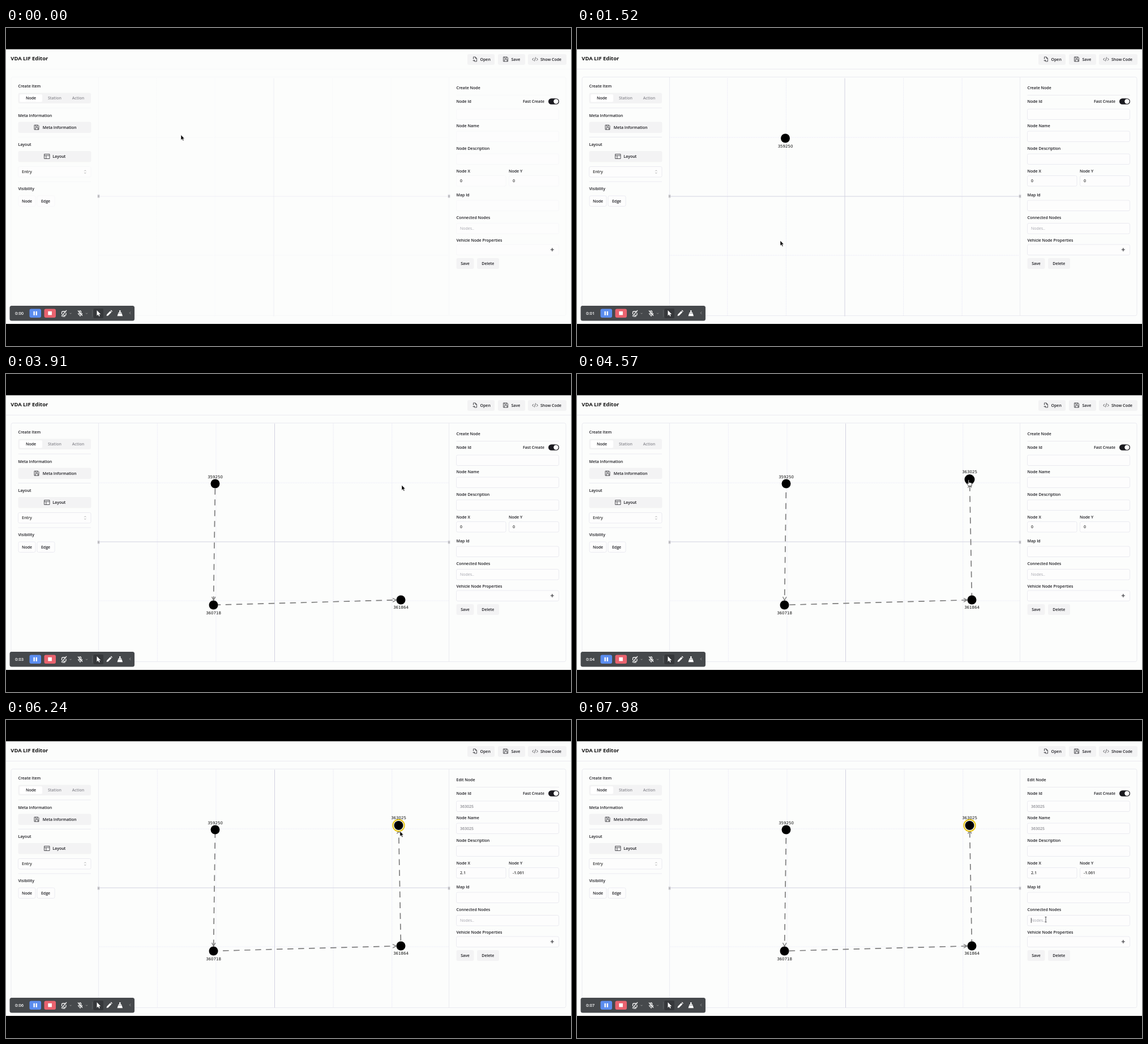
An HTML page for the animation above (8 s loop, 998x561 px).

```html
<!DOCTYPE html>
<html lang="en">
<head>
<meta charset="utf-8">
<title>VDA LIF Editor</title>
<style>
  html, body { margin: 0; width: 100%; height: 100%; overflow: hidden; background: #000; }
  svg { display: block; width: 100vw; height: 100vh; }
  text { font: 600 7px "Open Sans", "Noto Sans", sans-serif; fill: #1b1b20; white-space: pre; }
  .mid { text-anchor: middle; }
  .title { font-size: 9.4px; font-weight: 700; fill: #111; }
  .value { fill: #333; }
  .soft { fill: #8b8b91; }
  .hint { font-weight: 400; fill: #a4a4ac; }
  .label { font: 7px "DejaVu Sans", Verdana, sans-serif; fill: #111; text-anchor: middle; }
  .clock { font-size: 7.6px; fill: #fff; }
  .rule { fill: none; stroke: #e6e6ee; stroke-width: .8; }
  .icon { fill: none; stroke: #2c2c31; stroke-width: .8; }
  .tool { fill: none; stroke: #f2f2f2; stroke-width: 1.3; }
  .dim { fill: none; stroke: #999; stroke-width: 1; }
  .edge { fill: none; stroke: #7d7d7d; stroke-width: 1.7; }
</style>
</head>
<body>
<svg id="stage" viewBox="0 0 998 561" preserveAspectRatio="none"></svg>
<script>
const stage = document.getElementById('stage');
const LOOP = 8000;

const rect = (x, y, w, h, fill, r = 0, more = '') =>
  `<rect x="${x}" y="${y}" width="${w}" height="${h}" rx="${r}" fill="${fill}" ${more}/>`;
const text = (x, y, s, cls = '', id = '') => `<text x="${x}" y="${y}" class="${cls}" id="${id}">${s}</text>`;
const path = (d, cls, more = '') => `<path d="${d}" class="${cls}" ${more}/>`;
const box = (x, y, w, h) => rect(x, y, w, h, '#fdfdfd', 2.5, 'stroke="#e6e6ee" stroke-width=".8"');
const button = (x, y, w, h) => rect(x, y, w, h, '#f3f3f4', 3);

const disk = (x, y) => path(
  `M${x - 3.5} ${y - 4}h6l1.5 1.5v6.5h-8v-8zM${x - 1.8} ${y - 4}v2.5h3.6v-2.5M${x - 2} ${y + 4}v-3.5h4.5v3.5`, 'icon');

function header() {
  return text(8.3, 56.6, 'VDA LIF Editor', 'title')
    + path('M0 72.5H998', 'rule')
    + button(815, 46, 48, 19) + button(869, 46, 48, 19) + button(922, 46, 68, 19)
    + path('M825.5 55v-4h3.5l2.5 2.5v5.5h-4M829 51v2.5h2.5M824.5 57.5h3.5m-1.5-1.5l1.5 1.5l-1.5 1.5', 'icon')
    + disk(882.5, 55)
    + path('M932 53l-2.3 2.3l2.3 2.3M937 53l2.3 2.3l-2.3 2.3M935.5 51.5l-2 7', 'icon')
    + text(837.5, 57.7, 'Open') + text(892.5, 57.7, 'Save') + text(944, 57.7, 'Show Code');
}

function leftPanel() {
  const rules = [141, 192.5, 271].map(y => path(`M21.5 ${y}H150`, 'rule')).join('');
  return rules
    + text(21.5, 105, 'Create Item')
    + button(21.5, 114.5, 128.5, 18.5) + rect(24, 117, 40, 13.5, '#fff', 2)
    + text(44, 126.4, 'Node', 'mid') + text(86, 126.4, 'Station', 'mid soft') + text(127.5, 126.4, 'Action', 'mid soft')
    + text(21.5, 156.6, 'Meta Information')
    + button(21.5, 165.5, 129, 19.5) + disk(54, 175.2) + text(64.7, 177.8, 'Meta Information')
    + text(21.5, 208, 'Layout')
    + button(21.5, 217, 129, 19.5)
    + path('M67.5 222.5h9.5v8h-9.5zM67.5 225h9.5M70.8 225v5.5', 'icon') + text(82.3, 229.2, 'Layout')
    + box(21.5, 244.5, 128.5, 18.5) + text(28, 256.3, 'Entry', 'value')
    + path('M138.3 252.5l1.5-1.6l1.5 1.6M138.3 255l1.5 1.6l1.5-1.6', 'icon', 'style="stroke:#999"')
    + text(21.5, 286.4, 'Visibility')
    + box(22, 296, 30, 18.5) + box(55, 296, 31, 18.5)
    + text(37, 307.8, 'Node', 'mid') + text(70, 307.8, 'Edge', 'mid');
}

function rightPanel() {
  const wide = [143, 182, 222, 304, 344.5, 382].map(y => box(795.5, y, 181, 18.5)).join('');
  return wide + box(795.5, 260.5, 87.5, 18.5) + box(888.5, 260.5, 88, 18.5)
    + path('M795.5 118.5H977', 'rule')
    + text(795.5, 108, '', '', 'mode')
    + text(795.5, 132, 'Node Id') + text(913, 132, 'Fast Create')
    + rect(958, 124.2, 19, 10.6, '#1a1a1f', 5.3) + '<circle cx="971.5" cy="129.5" r="4.2" fill="#fff"/>'
    + text(802, 155, '', 'soft', 'nodeId')
    + text(795.5, 175.2, 'Node Name') + text(802, 194.3, '', 'soft', 'nodeName')
    + text(795.5, 214.6, 'Node Description')
    + text(795.5, 255, 'Node X') + text(888, 255, 'Node Y')
    + text(802, 272.4, '', 'value', 'nodeX') + text(895, 272.4, '', 'value', 'nodeY')
    + text(795.5, 297, 'Map Id')
    + text(795.5, 337.4, 'Connected Nodes') + text(802, 356, 'Nodes..', 'hint')
    + path('M802.3 349v9', 'icon', 'id="caret"')
    + text(795.5, 376.8, 'Vehicle Node Properties')
    + path('M961.8 391h6M964.8 388v6', 'icon', 'style="stroke-width:1.1"')
    + button(795.5, 406, 31, 19) + button(832, 406, 39, 19)
    + text(811, 417.8, 'Save', 'mid') + text(851.3, 417.8, 'Delete', 'mid');
}

function grid() {
  let faint = '';
  for (const k of [-2, -1, 1, 2]) faint += `M${474 + k * 103.6} 87V507`;
  for (const k of [-1, 1]) faint += `M164 ${295.5 + k * 104}H782`;
  return path(faint, 'rule', 'style="stroke:#e6e6f4" stroke-dasharray="2 1"')
    + path('M474 87V507M164 295.5H782', 'rule', 'style="stroke:#d2d2e0;stroke-width:1"');
}

function recorder() {
  const chevron = x => path(`M${x - 1.5} 502.3l1.5 1.5l1.5-1.5`, 'dim');
  return '<g transform="translate(.5 .5)">'
    + rect(6, 489.5, 220.5, 26.5, '#46494c', 3.5)
    + text(15.5, 505.3, '0:00', 'clock', 'clock')
    + rect(41, 495, 20.5, 15.5, '#5b8def', 3) + rect(48, 499.3, 2.3, 7, '#fff') + rect(52.1, 499.3, 2.3, 7, '#fff')
    + rect(67, 495, 20.5, 15.5, '#e9636f', 3) + rect(73.8, 499.3, 6.6, 6.6, '#fff')
    + path('M104 499.5h-4q-2 0-2 2v3M105.5 502v3q0 1.5-1.5 1.5h-3M97.5 508l9-10.5M99 508.3h5', 'tool') + chevron(113.5)
    + path('M129 499.5q1.5-2 3 0v3q-1.5 2-3 0zM127 502.5q.5 3.5 3.5 3.5t3.5-3.5M130.500 506v2.5M126.5 498l8 9', 'tool') + chevron(142)
    + path('M152 497v12', 'dim', 'style="stroke:#5d6063"')
    + rect(154, 494.5, 17.5, 17, '#36383b', 2)
    + '<path d="M160 497.500v9.500l2.200-2l1.600 3.200l1.500-.7l-1.600-3.100h3z" fill="#fff"/>'
    + '<path d="M177 507.500l.6-2.800l6-6l2.200 2.200l-6 6zM184.300 498l1-.9l2.100 2.100l-.9 1z" fill="#fff"/>'
    + '<path d="M199.700 497.500h2.200v3.800h1.700l.5 1.700h-6.600l.5-1.700h1.700zM197.300 503.500h7l1.200 4.200h-9.400z" fill="#fff"/>'
    + path('M219.700 500.200l-2 2l2 2', 'dim') + '</g>';
}

// Place, name, time of creation (ms) and label offset of each node
const nodes = [
  { x: 369, y: 193, id: 359250, at: 750, label: -9.5 },
  { x: 366, y: 407, id: 360718, at: 2218, label: 16 },
  { x: 697, y: 398, id: 361864, at: 3364, label: 15.5 },
  { x: 693, y: 185.5, id: 363025, at: 4525, label: -11 }
];
const selectAt = 5700, focusAt = 7600;
const dashSpeed = 38.8;

function edgeMarkup(i) {
  const a = nodes[i - 1], b = nodes[i];
  const angle = Math.atan2(b.y - a.y, b.x - a.x);
  const gap = 8.5;
  const ex = b.x - gap * Math.cos(angle), ey = b.y - gap * Math.sin(angle);
  return `<g id="edge${i}">`
    + path(`M${a.x} ${a.y}L${ex} ${ey}`, 'edge', 'stroke-dasharray="10.5 8.5"')
    + path('M-6-3.2L0 0L-6 3.2', 'edge',
      `style="stroke-width:1.4" transform="translate(${ex} ${ey}) rotate(${angle * 180 / Math.PI})"`) + '</g>';
}

const nodeMarkup = (n, i) => `<g id="node${i}"><circle cx="${n.x}" cy="${n.y}" r="8"/>`
  + text(n.x, n.y + n.label, n.id, 'label') + '</g>';

stage.innerHTML = rect(0, 0, 998, 561, '#000') + rect(0, 37.5, 998, 484.5, '#fcfdfc')
  + header()
  + rect(9, 86.5, 980, 421, 'none', 3, 'class="rule"') + path('M163.5 87V507M782.5 87V507', 'rule')
  + leftPanel() + rightPanel()
  + '<g id="graph">' + grid() + [1, 2, 3].map(edgeMarkup).join('')
  + '<circle id="ring" cx="693" cy="185.5" r="10.2" fill="#fcfdfc" stroke="#e6c414" stroke-width="2"/>'
  + nodes.map(nodeMarkup).join('') + '</g>'
  + [163.5, 782.5].map(x => rect(x - 2, 293.5, 4, 6.5, '#dedee3', 1)
    + path(`M${x - .6} 295v3.6M${x + .6} 295v3.6`, 'icon', 'style="stroke:#777;stroke-width:.5"')).join('')
  + recorder()
  + '<path id="arrow" d="M0 0V9.2L2.1 7.3L3.6 10.5L5.1 9.8L3.6 6.7H6.3Z" fill="#000" stroke="#fff" stroke-width=".6"/>'
  + '<path id="hand" d="M-.8 0Q0-.9.8 0V4L4.5 4.8Q6 5.2 5.7 6.7L5 10.5H0L-3.2 6.6Q-3.3 5.3-2 5.7L-.8 6.5Z" fill="#fff" stroke="#111" stroke-width=".8"/>'
  + path('M-1.5-4.5H1.5M0-4.5V4.5M-1.5 4.5H1.5', 'icon', 'id="beam"');

const $ = id => document.getElementById(id);
const show = (el, on) => el.setAttribute('visibility', on ? 'visible' : 'hidden');
const faintLines = [...document.querySelectorAll('.rule, rect[stroke]')];

// Pointer tip: time, x, y
const track = [
  [0, 309, 188.5], [30, 309, 188.5], [500, 367, 194], [860, 367, 194], [1300, 359, 375],
  [1520, 359, 375], [1810, 365, 424], [1960, 365, 424], [2170, 366, 407], [2290, 366, 407],
  [2610, 574, 409], [2790, 600, 408], [3300, 697, 398], [3480, 697, 398], [3910, 699, 196],
  [4420, 692, 187], [5290, 690, 189], [6130, 690, 189], [6930, 803, 325], [7180, 825, 340],
  [7480, 828, 352], [8000, 828, 352]
];

function pointer(t) {
  const i = track.findIndex((k, j) => j && t <= k[0]);
  const [t0, x0, y0] = track[i - 1], [t1, x1, y1] = track[i];
  const u = (t - t0) / (t1 - t0), e = u * u * (3 - 2 * u);
  return [x0 + (x1 - x0) * e, y0 + (y1 - y0) * e];
}

function draw(t) {
  const clear = Math.min(1, Math.max(.3, .3 + (t - 30) / 470 * .7));
  faintLines.forEach(el => el.setAttribute('stroke-opacity', clear));

  const [dx, dy] = t < nodes[1].at ? [-1, 1.5] : t < 2790 ? [.5, -.5] : [.5, .5];
  $('graph').setAttribute('transform', `translate(${dx} ${dy})`);

  const [px, py] = pointer(t);
  let over = false;
  nodes.forEach((n, i) => {
    const g = $('node' + i), made = t >= n.at;
    const hit = made && Math.hypot(px - n.x - dx, py - n.y - dy) < 9;
    over = over || hit;
    show(g, made);
    g.firstChild.setAttribute('r', hit ? 9 : 8);
    if (!i) return;
    const edge = $('edge' + i);
    show(edge, made);
    // Dashes start flowing when their edge is made.
    edge.firstChild.setAttribute('stroke-dashoffset', -dashSpeed * (t - n.at) / 1000);
  });
  // The first label sits below its node until an edge leaves downwards.
  $('node0').lastChild.setAttribute('y', nodes[0].y + (t < nodes[1].at ? 16 : nodes[0].label));

  const edit = t >= selectAt;
  show($('ring'), edit);
  $('mode').textContent = edit ? 'Edit Node' : 'Create Node';
  $('nodeId').textContent = $('nodeName').textContent = edit ? nodes[3].id : '';
  $('nodeX').textContent = edit ? '2.1' : '0';
  $('nodeY').textContent = edit ? '-1.061' : '0';
  show($('caret'), t >= focusAt);
  $('clock').textContent = '0:0' + Math.max(0, Math.floor((t - 30) / 1000));

  const typing = px > 796 && py > 345 && py < 363;
  const shape = typing ? 'beam' : over ? 'hand' : 'arrow';
  for (const id of ['arrow', 'hand', 'beam']) {
    show($(id), id === shape);
    $(id).setAttribute('transform', `translate(${px} ${py})`);
  }
}

const start = performance.now();
function tick() {
  draw((performance.now() - start) % LOOP);
  requestAnimationFrame(tick);
}
tick();
</script>
</body>
</html>
```
